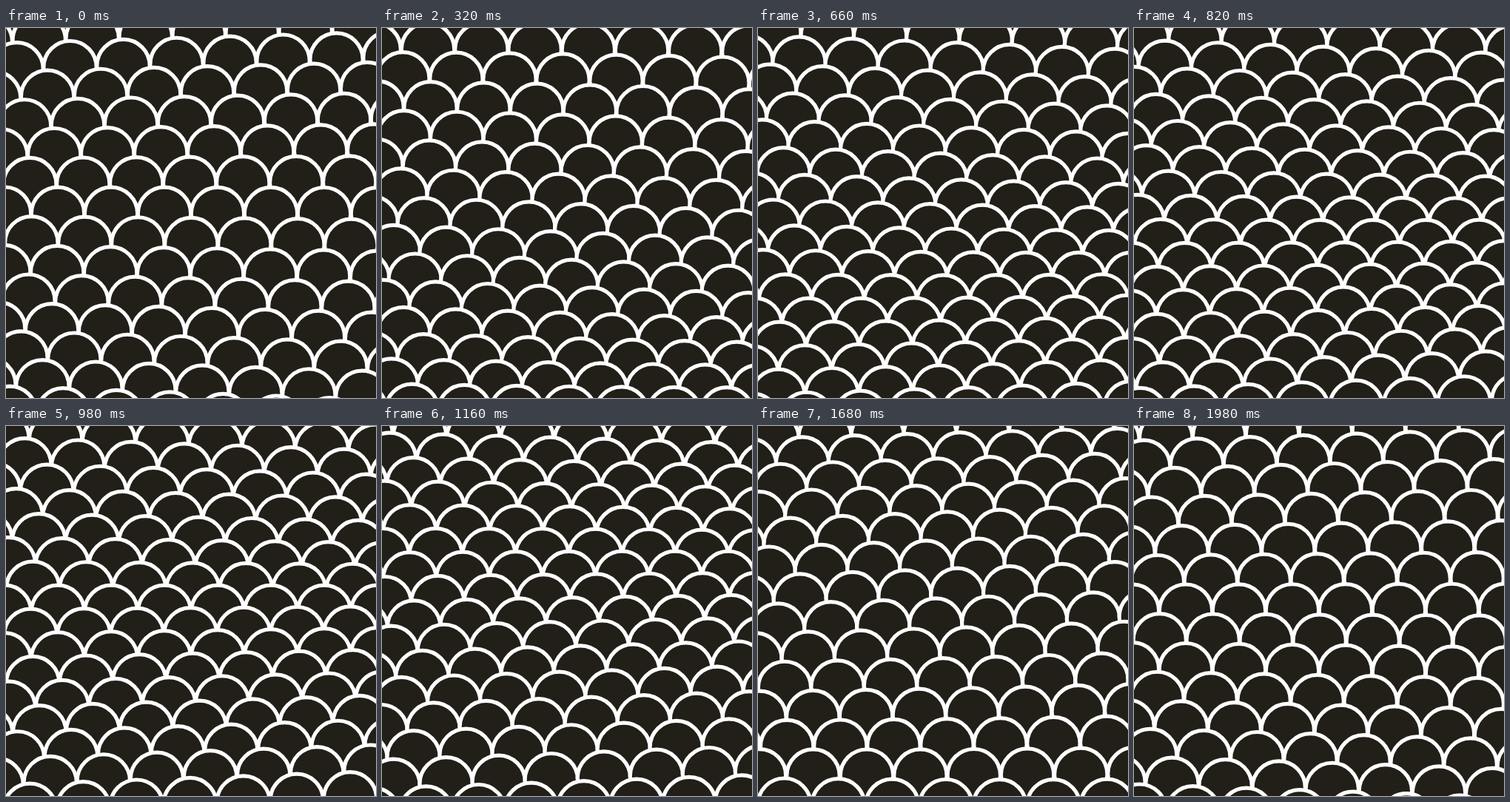
Animation, 500 px wide and 500 px high, one loop 2 s. Source, as an HTML page with a canvas:

```html
<!DOCTYPE html>
<html>
<head>
<meta charset="utf-8">
<title>Drifting scales</title>
<style>
  html, body { margin: 0; width: 100%; height: 100%; overflow: hidden; background: #211f18; }
  canvas { display: block; }
</style>
</head>
<body>
<canvas id="stage" width="500" height="500"></canvas>
<script>
const ctx = document.getElementById('stage').getContext('2d');
const LOOP = 2000, GAP = 72, ROW = 36, RADIUS = 35.7;

function scale(x, y) {
  ctx.beginPath();
  ctx.arc(x, y, RADIUS, 0, 2 * Math.PI);
  ctx.fill();
  ctx.stroke();
}

function draw(now) {
  const turn = 2 * Math.PI * (now % LOOP) / LOOP;
  const sway = 0.00065 * Math.sin(turn);
  ctx.fillStyle = '#211f18';
  ctx.fillRect(0, 0, 500, 500);
  ctx.strokeStyle = '#fff';
  ctx.lineWidth = 5.2;

  // Lower rows overlap upper ones; every scale orbits its grid point.
  for (let row = -10; row <= 10; row++) {
    for (let col = -6; col <= 6; col++) {
      const x = GAP * col + (row % 2 ? GAP / 2 : 0);
      const phase = turn + 0.2 * row + sway * x;
      scale(
        250 + x + (36 + 1.1 * row) * Math.cos(phase),
        250.1 + ROW * row + (27 + 0.036 * x) * Math.sin(phase + 0.03)
      );
    }
  }
}

const start = performance.now();
function tick() {
  draw(performance.now() - start);
  requestAnimationFrame(tick);
}
tick();
</script>
</body>
</html>
```
